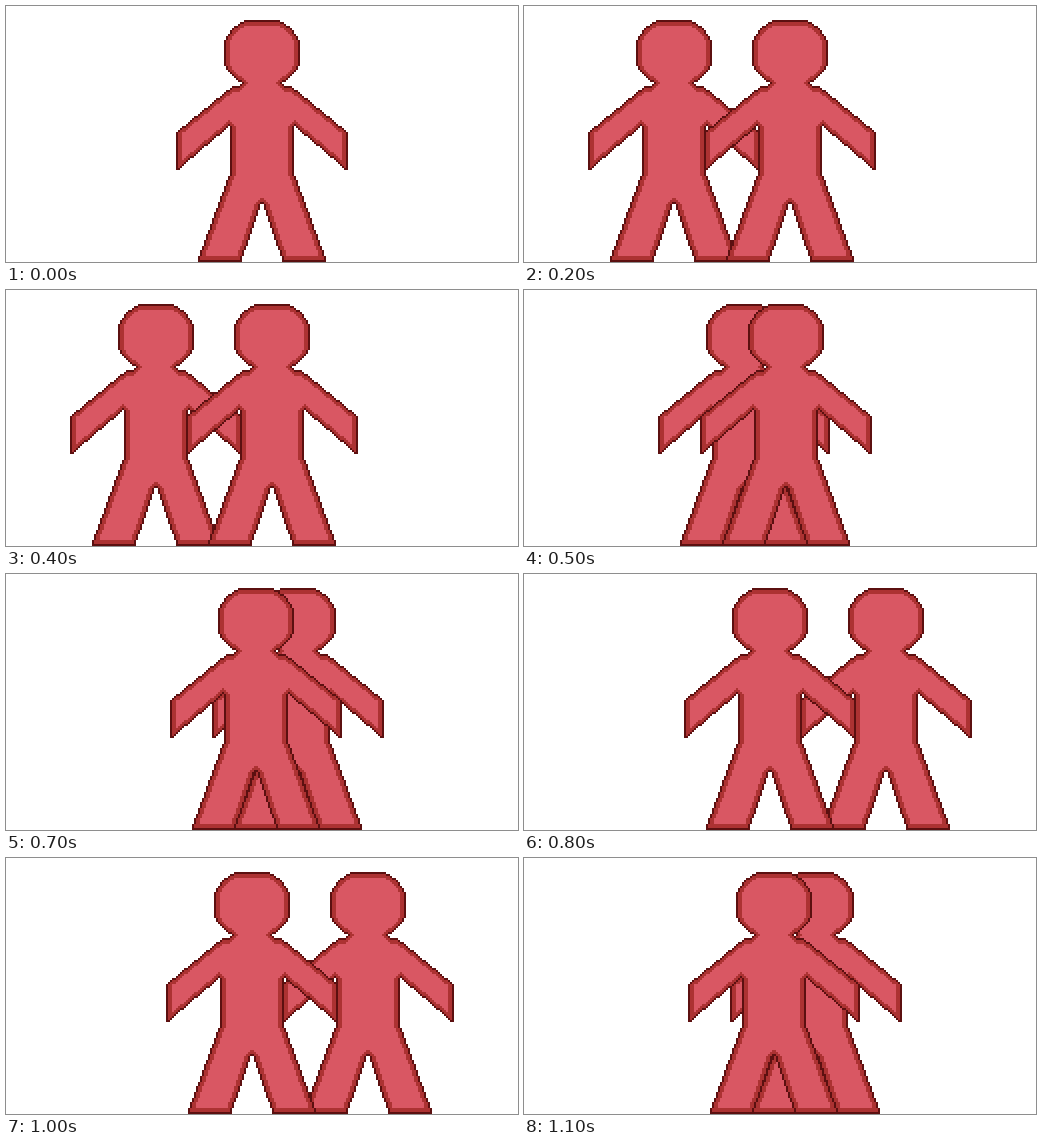
Animation of 512 by 256 pixels, one loop 1200 ms. Source, as an HTML page with a canvas:

```html
<!DOCTYPE html>
<html>
<head>
<meta charset="utf-8">
<style>
html, body { margin: 0; width: 100%; height: 100%; overflow: hidden; background: #fff; }
canvas { display: block; width: 512px; height: 256px; image-rendering: pixelated; }
</style>
</head>
<body>
<canvas id="stage" width="256" height="128"></canvas>
<script>
const W = 86, H = 128;
const ctx = document.getElementById('stage').getContext('2d');

// Right half of the figure; the left half mirrors it.
const half = new Path2D('M0 14H11L20 17 30 25 36 35 38 42V56L34 63 17 79 28 81 32 84 86 128V164L32 118V170L64 256H22L0 192Z');

// A cell belongs to the body when any of its corners does.
const corners = [[0.1, 0.1], [1.9, 0.1], [0.1, 1.9], [1.9, 1.9]];
const inBody = (x, y) => y < H && corners.some(([dx, dy]) =>
  ctx.isPointInPath(half, Math.abs(2 * x + dx - W), 2 * y + dy));
const shrink = test => (x, y) => test(x, y) &&
  test(x - 1, y) && test(x + 1, y) && test(x, y - 1) && test(x, y + 1);
const inLine = shrink(inBody);
const inFill = shrink(shrink(inLine));

function makeFigure() {
  const figure = document.createElement('canvas');
  figure.width = W;
  figure.height = H;
  const g = figure.getContext('2d');
  for (const [test, color] of [[inBody, '#5c1010'], [inLine, '#ac3232'], [inFill, '#d95763']]) {
    g.fillStyle = color;
    for (let y = 0; y < H; y++)
      for (let x = 0; x < W; x++)
        if (test(x, y)) g.fillRect(x, y, 1, 1);
  }
  return figure;
}

const figure = makeFigure();
const backShift = [0, 18, 53, 76, 53, 18];
const frontShift = [0, 3, 5, 9, 5, 3];

function draw(now) {
  const step = Math.floor(now / 100) % 12;
  const side = step < 6 ? -1 : 1;
  const i = step % 6;
  const put = shift => ctx.drawImage(figure, 128 - W / 2 + shift, 0);
  ctx.clearRect(0, 0, 256, 128);
  put(side * backShift[i]);
  put(-side * frontShift[i]);
}

const start = performance.now();
function tick() {
  draw(performance.now() - start);
  requestAnimationFrame(tick);
}
tick();
</script>
</body>
</html>
```
